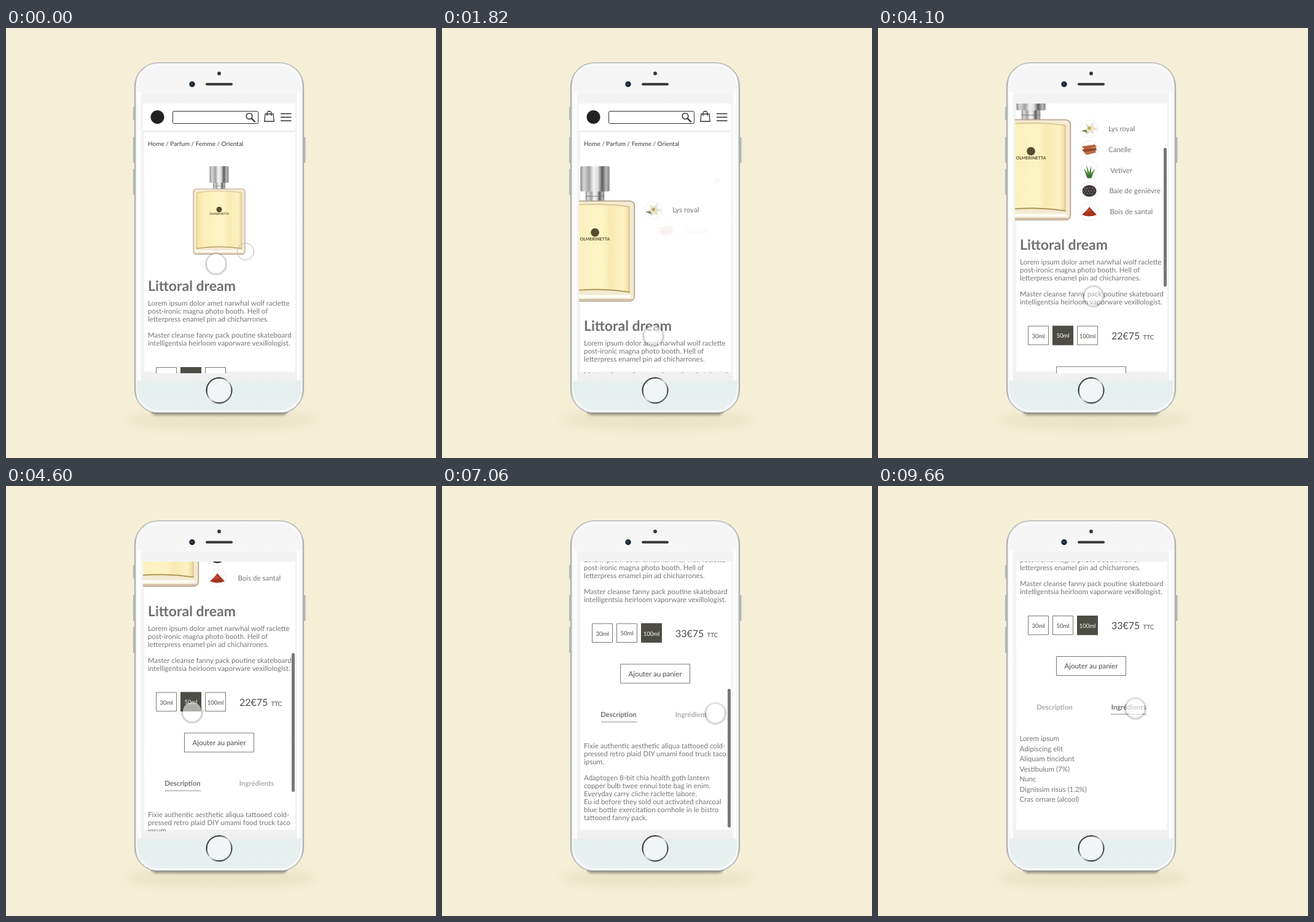
An HTML page that plays this animation: 700 by 700 pixels, repeating every 9.76 s.

```html
<!DOCTYPE html>
<html lang="fr">
<head>
<meta charset="utf-8">
<title>Fiche parfum</title>
<style>
html, body { margin: 0; height: 100%; overflow: hidden; background: #f5efd7; }
svg { display: block; width: 100vw; height: 100vh; }
text { font: 11.5px Lato, sans-serif; fill: #757575; text-rendering: geometricPrecision; }
.mid { text-anchor: middle; }
.crumb { font-size: 10px; fill: #3c3c3c; }
.title { font-size: 23px; font-weight: 700; fill: #707070; }
.size { font-size: 9.5px; fill: #4a4a45; }
.price { font-size: 16px; fill: #4a4a45; }
.tax { font-size: 9.7px; fill: #4a4a45; }
.dark { fill: #4a4a45; }
.tab { font-size: 11.3px; font-weight: 700; }
.brand { font-size: 4.6px; font-weight: 700; fill: #564c30; }
.line { fill: none; stroke: #2e2e2e; }
.box { fill: #fff; stroke: #77776f; }
</style>
</head>
<body>
<svg viewBox="0 0 700 700">
  <defs>
    <linearGradient id="metal">
      <stop offset="0" stop-color="#8b8b8b"/><stop offset=".12" stop-color="#d8d8d8"/>
      <stop offset=".3" stop-color="#a2a2a2"/><stop offset=".45" stop-color="#f4f4f4"/>
      <stop offset=".6" stop-color="#dedede"/><stop offset=".75" stop-color="#5c5c5c"/>
      <stop offset=".88" stop-color="#b9b9b9"/><stop offset="1" stop-color="#858585"/>
    </linearGradient>
    <linearGradient id="juice">
      <stop offset="0" stop-color="#f6e2a0"/><stop offset=".15" stop-color="#fbefb9"/>
      <stop offset=".6" stop-color="#fdf4c6"/><stop offset=".72" stop-color="#f9eab0"/>
      <stop offset=".92" stop-color="#fcf1c4"/><stop offset="1" stop-color="#eed898"/>
    </linearGradient>
    <linearGradient id="rim">
      <stop offset="0" stop-color="#b4b8ba"/><stop offset=".02" stop-color="#eceeef"/>
      <stop offset=".98" stop-color="#eceeef"/><stop offset="1" stop-color="#b4b8ba"/>
    </linearGradient>
    <linearGradient id="face" x2="0" y2="1">
      <stop offset="0" stop-color="#f5f5f5"/><stop offset=".085" stop-color="#f6f6f6"/>
      <stop offset=".086" stop-color="#f2f2f2"/><stop offset=".12" stop-color="#f3f4f4"/>
      <stop offset=".88" stop-color="#f1f2f2"/><stop offset=".914" stop-color="#efefef"/>
      <stop offset=".915" stop-color="#e6efee"/><stop offset="1" stop-color="#e8efef"/>
    </linearGradient>
    <linearGradient id="ring" x2="1" y2="1">
      <stop offset="0" stop-color="#777"/><stop offset=".25" stop-color="#222"/>
      <stop offset=".5" stop-color="#ddd"/><stop offset=".75" stop-color="#333"/>
      <stop offset="1" stop-color="#aaa"/>
    </linearGradient>
    <radialGradient id="halo">
      <stop offset=".76" stop-color="#000" stop-opacity="0"/>
      <stop offset=".8" stop-color="#000" stop-opacity=".22"/>
      <stop offset="1" stop-color="#000" stop-opacity="0"/>
    </radialGradient>
    <filter id="blur" x="-30%" y="-200%" width="160%" height="500%"><feGaussianBlur stdDeviation="9"/></filter>
    <filter id="soft" x="-10%" y="-200%" width="120%" height="500%"><feGaussianBlur stdDeviation="2"/></filter>
    <clipPath id="screen"><path d="M223 123h247.5v439h-247.5z"/></clipPath>
  </defs>

  <rect width="700" height="700" fill="#f5efd7"/>
  <ellipse cx="350" cy="638" rx="158" ry="15" fill="#e8e3c6" filter="url(#blur)"/>
  <rect x="238" y="620" width="218" height="10" rx="5" fill="#8b887a" filter="url(#soft)"/>

  <g fill="#c3c6c8" stroke="#9b9ea0" stroke-width=".7">
    <path d="M207.500 129h2v21h-2zM207.500 178h2v41h-2zM207.500 230h2v41h-2zM485 178h2v41h-2z"/>
  </g>
  <rect x="209.500" y="56.500" width="275" height="570.500" rx="39" fill="url(#rim)" stroke="#a4a8aa" stroke-width="1.200"/>
  <path d="M236 626.500H458" stroke="#85898a"/>
  <rect x="212.500" y="60" width="269" height="563" rx="36" fill="url(#face)" stroke="#fff" stroke-width="1.500"/>
  <path d="M217 104V574M476.500 104V574" stroke="#fbfcfc" stroke-width="6"/>
  <circle cx="347" cy="74" r="3" fill="#3a3a3c"/>
  <circle cx="303" cy="91.500" r="4.700" fill="#20262e"/>
  <circle cx="302.500" cy="91" r="1.800" fill="#31506c"/>
  <rect x="325" y="89.500" width="44" height="4" rx="2" fill="#353535"/>
  <circle cx="347" cy="590" r="20.500" fill="#f1f5f5" stroke="url(#ring)" stroke-width="2"/>
  <path d="M225 123h245.500v436.500h-245.500z" fill="#fff"/>

  <g clip-path="url(#screen)">
    <g id="page">
      <path d="M223 164h248v3.500h-248z" fill="#aaa" opacity=".55" filter="url(#soft)"/>
      <path d="M223 100h248v67h-248z" fill="#fff"/>
      <circle cx="246.500" cy="145" r="11" fill="#222"/>
      <rect class="line" x="271.500" y="135.500" width="139" height="20" rx="2"/>
      <g class="line" stroke-width="1.600">
        <circle cx="396" cy="143.500" r="4.800"/>
        <path d="M399.500 147l6 6" stroke-width="2.200"/>
        <path d="M422 140h13l1.200 12h-15.400zM425 143v-4a3.500 3.500 0 0 1 7 0v4" stroke-width="1.300"/>
        <path d="M447 139.500h17.500M447 145.300h17.500M447 151h17.500"/>
      </g>
      <text class="crumb" x="231" y="192">Home / Parfum / Femme / Oriental</text>

      <g id="bottle">
        <path d="M-10 24h20v13h-20z" fill="url(#metal)"/>
        <path d="M-10 32h20" stroke="#777" stroke-width=".6"/>
        <rect x="-15.500" width="31" height="27" rx="1.500" fill="url(#metal)"/>
        <rect x="-42" y="37" width="84" height="106.500" rx="5" fill="#f4ead2" stroke="#b7a68c" stroke-width="1.200"/>
        <path d="M-36.500 43q36.500-5 73 0v91q-36.500-5-73 0z" fill="url(#juice)" stroke="#d3bd84" stroke-width=".9"/>
        <path d="M-37 134q37-6 74 0" fill="none" stroke="#a98f4f"/>
        <path d="M-38 138.500h76" stroke="#fffdf5" stroke-width="3"/>
        <path d="M-39 142h78" stroke="#c3ad95"/>
        <circle cy="70.500" r="4.500" fill="#564c30"/>
        <text class="mid brand" y="79">OLMERINETTA</text>
      </g>
      <circle id="hotspot" cx="390" cy="364" r="13.700" fill="none" stroke="#b5b5b5"/>
      <path id="close" d="M444.500 245.500l7 7m0-7l-7 7" stroke="#858585" stroke-width="1.700"/>

      <g class="note"><g>
        <path d="M-13 3l9-4-2-8 6 4 7-6-1 8 9 4-9 2 2 6-7-3-5 5-1-6z" fill="#e5e3cd"/>
        <path d="M-13 3l8-1 2 5z" fill="#6f7b48"/><circle cy="-1" r="2.600" fill="#bda64f"/></g>
        <text x="375" y="4">Lys royal</text></g>
      <g class="note"><g>
        <path d="M-12-5L9-8l3 4-20 4z" fill="#b4603a"/><path d="M-12 0L11-3l1 4L-7 6z" fill="#96482a"/>
        <path d="M-9 5L10 1l1 4L-4 9z" fill="#bd7048"/></g>
        <text x="375" y="4">Canelle</text></g>
      <g class="note"><g>
        <path d="M-4 12L-9-3l6 8-2-14 5 13 3-12 0 13 6-8-5 15z" fill="#4f8a3c"/><path d="M-4 7h8l-1 6h-6z" fill="#397030"/></g>
        <text x="378" y="4">Vetiver</text></g>
      <g class="note"><g>
        <ellipse rx="11.500" ry="9.500" fill="#3f3a39"/>
        <path d="M-8-4h15M-10 0h19M-8 4h15" stroke="#857c78" stroke-width="2" stroke-linecap="round" stroke-dasharray="0 4.500"/></g>
        <text x="376.500" y="4">Baie de genièvre</text></g>
      <g class="note"><g>
        <path d="M-12 5Q-4-2 0-8q5 6 12 13-12 5-24 0z" fill="#a53320"/><path d="M-6 2q3-5 6-8l4 6z" fill="#bf4a2c"/></g>
        <text x="377.500" y="4">Bois de santal</text></g>

      <g id="lower">
        <text class="title" x="231" y="428">Littoral dream</text>
        <g id="intro"></g>
        <g class="box">
          <path d="M244.500 552.500h33v30.500h-33zM284.500 552.500h33v30.500h-33zM324.500 552.500h33v30.500h-33z"/>
          <path d="M290.500 618.500h113v31h-113z"/>
        </g>
        <text class="mid size" x="261" y="572">30ml</text>
        <text class="mid size" x="301" y="571.500">50ml</text>
        <text class="mid size" x="341" y="572">100ml</text>
        <g id="medium">
          <path d="M284 552h34v31.500h-34z" fill="#4d4d46"/>
          <text class="mid size" x="301" y="571.500" style="fill:#fff">50ml</text>
          <text class="price" x="380" y="574">22€75</text>
        </g>
        <g id="large">
          <path d="M324 552h34v31.500h-34z" fill="#4d4d46"/>
          <text class="mid size" x="341" y="572" style="fill:#fff">100ml</text>
          <text class="price" x="380" y="574">33€75</text>
        </g>
        <text class="tax" x="431.500" y="574">TTC</text>
        <text class="mid dark" x="347" y="638">Ajouter au panier</text>
        <text class="mid tab" id="tabA" x="287.500" y="704.500">Description</text>
        <text class="mid tab" id="tabB" x="408" y="704.500">Ingrédients</text>
        <g id="description"><path d="M259 712.500h58.500" stroke="#8a8a8a"/></g>
        <g id="ingredients"><path d="M379 712.500h58.500" stroke="#8a8a8a"/></g>
      </g>
    </g>
    <rect id="bar" x="465" width="5" height="226" rx="2.500" fill="#787878"/>
    <g id="cursor">
      <circle cy="1.500" r="19.500" fill="url(#halo)"/>
      <circle id="knob" r="15.300" fill="#fff"/>
      <circle r="15.300" fill="none" stroke="#000" stroke-opacity=".1" stroke-width=".8"/>
    </g>
  </g>
</svg>
<script>
const LOOP = 9760;
const $ = id => document.getElementById(id);
const NS = "http://www.w3.org/2000/svg";

function addLines(id, x, y, step, lines) {
  lines.forEach((line, i) => {
    const el = document.createElementNS(NS, "text");
    el.setAttribute("x", x);
    el.setAttribute("y", y + i * step);
    el.textContent = line;
    $(id).append(el);
  });
}

addLines("intro", 231, 452, 13, [
  "Lorem ipsum dolor amet narwhal wolf raclette",
  "post-ironic magna photo booth. Hell of",
  "letterpress enamel pin ad chicharrones.",
  "",
  "Master cleanse fanny pack poutine skateboard",
  "intelligentsia heirloom vaporware vexillologist."
]);
addLines("description", 231, 755.5, 13, [
  "Fixie authentic aesthetic aliqua tattooed cold-",
  "pressed retro plaid DIY umami food truck taco",
  "ipsum.",
  "",
  "Adaptogen 8-bit chia health goth lantern",
  "copper bulb twee ennui tote bag in enim.",
  "Everyday carry cliche raclette labore.",
  "Eu id before they sold out activated charcoal",
  "blue bottle exercitation cornhole in le bistro",
  "tattooed fanny pack."
]);
addLines("ingredients", 230.5, 756, 16.5, [
  "Lorem ipsum", "Adipiscing elit", "Aliquam tincidunt", "Vestibulum (7%)",
  "Nunc", "Dignissim risus (1.2%)", "Cras ornare (alcool)"
]);

const notes = [...document.querySelectorAll(".note")];
notes.forEach(note => {
  const rim = document.createElementNS(NS, "circle");
  rim.setAttribute("r", 14.5);
  rim.setAttribute("fill", "#fff");
  rim.setAttribute("stroke", "#eee");
  note.firstElementChild.prepend(rim);
  note.firstElementChild.setAttribute("transform", "translate(344)");
});

const ease = u => u < .5 ? 2 * u * u : 1 - 2 * (1 - u) ** 2;
const ramp = (t, from, to) => ease(Math.min(1, Math.max(0, (t - from) / (to - from))));

// Eased value through alternating time, value pairs.
function track(t, ...keys) {
  let value = keys[1];
  for (let i = 2; i < keys.length; i += 2)
    value += (keys[i + 1] - keys[i - 1]) * ramp(t, keys[i - 2], keys[i]);
  return value;
}

const move = (el, x, y, scale = 1) => el.setAttribute("transform", `translate(${x} ${y}) scale(${scale})`);
const fade = (el, opacity) => el.setAttribute("opacity", opacity);
const grey = v => `rgb(${v},${v},${v})`;

function draw(t) {
  const open = ramp(t, 1000, 1700);
  const scroll = track(t, 3483, 0, 4784, 293, 6610, 293, 7200, 406);
  move($("page"), 0, -scroll);
  move($("lower"), 0, 65 * open);
  move($("bottle"), 347 - 98 * open, 225, 1 + .53 * open);
  fade($("hotspot"), 1 - ramp(t, 950, 1150));
  fade($("close"), ramp(t, 1740, 2120));

  notes.forEach((note, i) => {
    const show = ramp(t, 1460 + i * 290, 1850 + i * 290);
    move(note, 22 * (1 - show), 296.3 + 33.75 * i);
    fade(note, show);
  });

  const bigger = ramp(t, 5620, 5820);
  fade($("medium"), 1 - bigger);
  fade($("large"), bigger);

  const swap = ramp(t, 8400, 8780);
  fade($("description"), 1 - swap);
  fade($("ingredients"), swap);
  $("tabA").style.fill = grey(112 + 58 * swap);
  $("tabB").style.fill = grey(170 - 58 * swap);

  $("bar").setAttribute("y", 126.6 + .517 * scroll);
  fade($("bar"), track(t, 3400, 0, 3520, 1, 4760, 1, 4930, 0, 6620, 0, 6720, 1, 7120, 1, 7210, 0));

  const x = track(t, 20, 342, 760, 388, 1060, 388, 1820, 344, 2100, 344, 2940, 395,
    3480, 395, 3620, 395, 4600, 303, 5040, 331, 5240, 331, 5420, 336,
    5620, 336, 6580, 433, 6610, 433, 7060, 445, 7440, 445, 7880, 419);
  const y = track(t, 20, 383, 760, 366, 1060, 366, 1820, 500, 2400, 512, 2940, 505,
    3480, 505, 3620, 499, 4600, 367, 5040, 341, 5240, 341, 5420, 339,
    6140, 339, 6600, 465, 7060, 369, 8400, 369, 8780, 361);
  move($("cursor"), x, y);
  fade($("knob"), track(t, 760, 1, 960, .4, 1820, .55, 2200, 1, 3000, 1, 3200, .35,
    4200, .35, 4600, .55, 5000, .8, 5240, .8, 5420, .5, 5620, .5, 6000, 1,
    6580, 1, 6700, .5, 7060, .82, 8400, .82, 8600, .65));
}

function tick() {
  draw(performance.now() % LOOP);
  requestAnimationFrame(tick);
}
tick();
</script>
</body>
</html>
```
